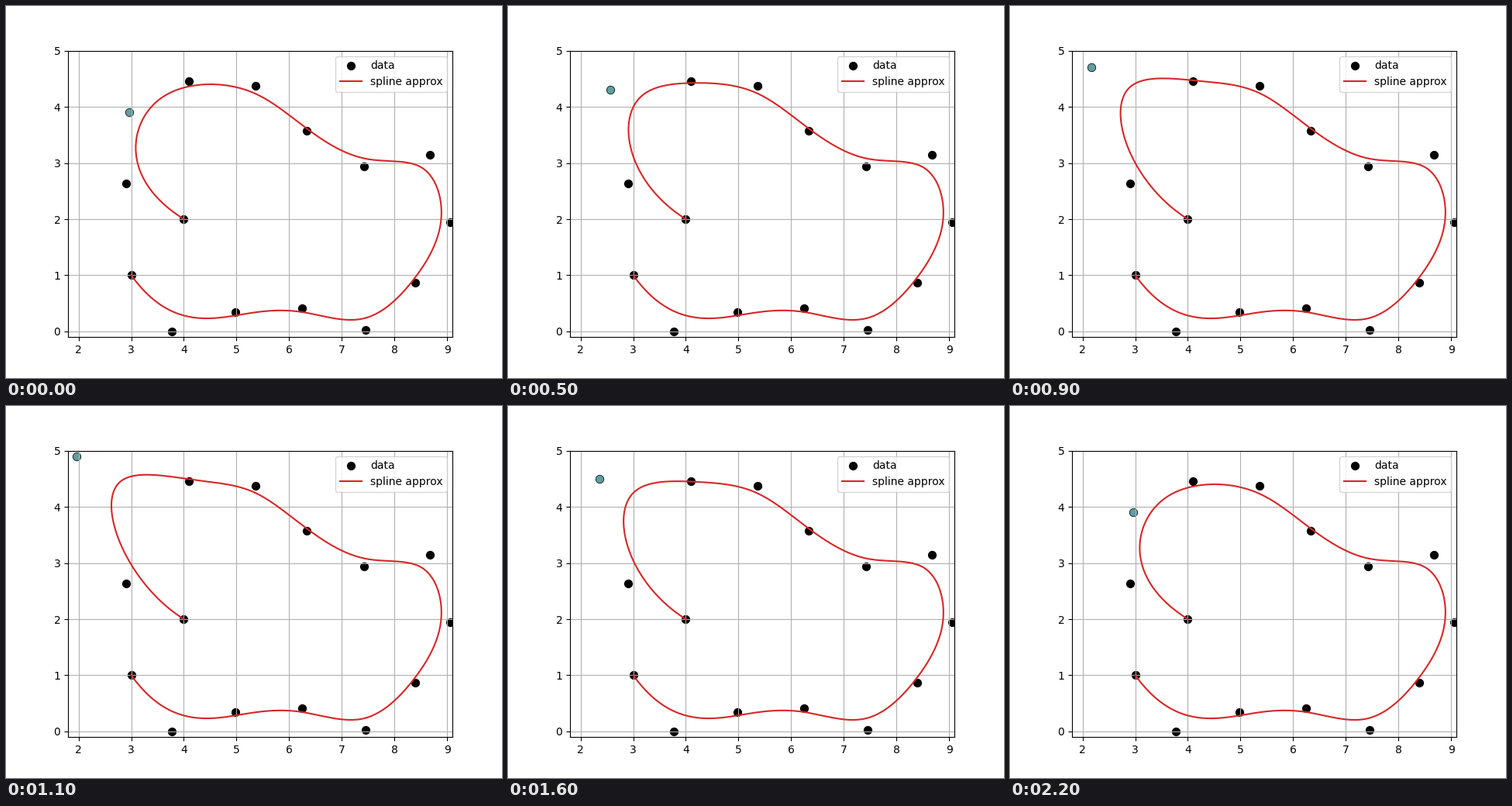
Recreate the animation shown at these times as a matplotlib script. Size 640 px wide and 480 px high, loop 2300 ms.

```python
import numpy as np
import matplotlib.pyplot as plt
from matplotlib.animation import FuncAnimation

STEPS = 10            # moves out, and again back
FRAMES = 2 * STEPS + 3
MOVING = 2            # index of the dragged point
DRAG = 0.1 * np.array([-1, 1])

# The points are a walk of equal strides: start, stride, headings in degrees.
START, STRIDE = 4 + 2j, 1.264
HEADINGS = [149.7, 87.5, 26.2, -3.9, -39.4, -30.2, 9.6,
            -72.4, -121.7, -138.3, 162.1, 183.1, 195.9, 127.4]


def walk(start, stride, headings):
    steps = stride * np.exp(1j * np.radians(headings))
    path = np.cumsum(np.r_[start, steps])
    return np.column_stack([path.real, path.imag])


def ratio(num, den):
    return num * np.divide(1, den, out=np.zeros_like(den), where=den > 0)


def spline(ctrl, k=3, samples=400):
    """Clamped B-spline with knots at the chord lengths of its control points."""
    chords = np.hypot(*np.diff(ctrl, axis=0).T)
    u = np.r_[0, np.cumsum(chords)]
    knots = np.r_[[0] * (k + 1), u[2:-2], [u[-1]] * (k + 1)]
    t = np.linspace(0, u[-1] * (1 - 1e-9), samples)[:, None]
    basis = ((knots[:-1] <= t) & (t < knots[1:])).astype(float)
    for d in range(1, k + 1):
        lo, hi = knots[:-d - 1], knots[d + 1:]
        rise = ratio(t - lo, knots[d:-1] - lo)
        fall = ratio(hi - t, hi - knots[1:-d])
        basis = rise * basis[:, :-1] + fall * basis[:, 1:]
    return basis @ ctrl


def pose(i):
    """Straight out and back, with one extra beat at each end."""
    shift = np.clip(min(i - 1, FRAMES - 1 - i), 0, STEPS)
    pts = POINTS.copy()
    pts[MOVING] += shift * DRAG
    return pts


POINTS = walk(START, STRIDE, HEADINGS)

fig, ax = plt.subplots(figsize=(6.4, 4.8), dpi=100)
data = ax.scatter(*POINTS.T, s=50, color="black", label="data")
handle = ax.scatter(*POINTS[MOVING], s=36, color="cadetblue")
curve, = ax.plot(*spline(POINTS).T, color="tab:red", label="spline approx")
ax.set(xlim=(1.8, 9.1), ylim=(-0.1, 5))
ax.grid(True)
ax.legend(loc="upper right")


def update(i):
    pts = pose(i)
    data.set_offsets(pts)
    handle.set_offsets(pts[MOVING])
    curve.set_data(*spline(pts).T)
    return data, handle, curve


anim = FuncAnimation(fig, update, frames=FRAMES, interval=100, repeat=True)
plt.show()
```
